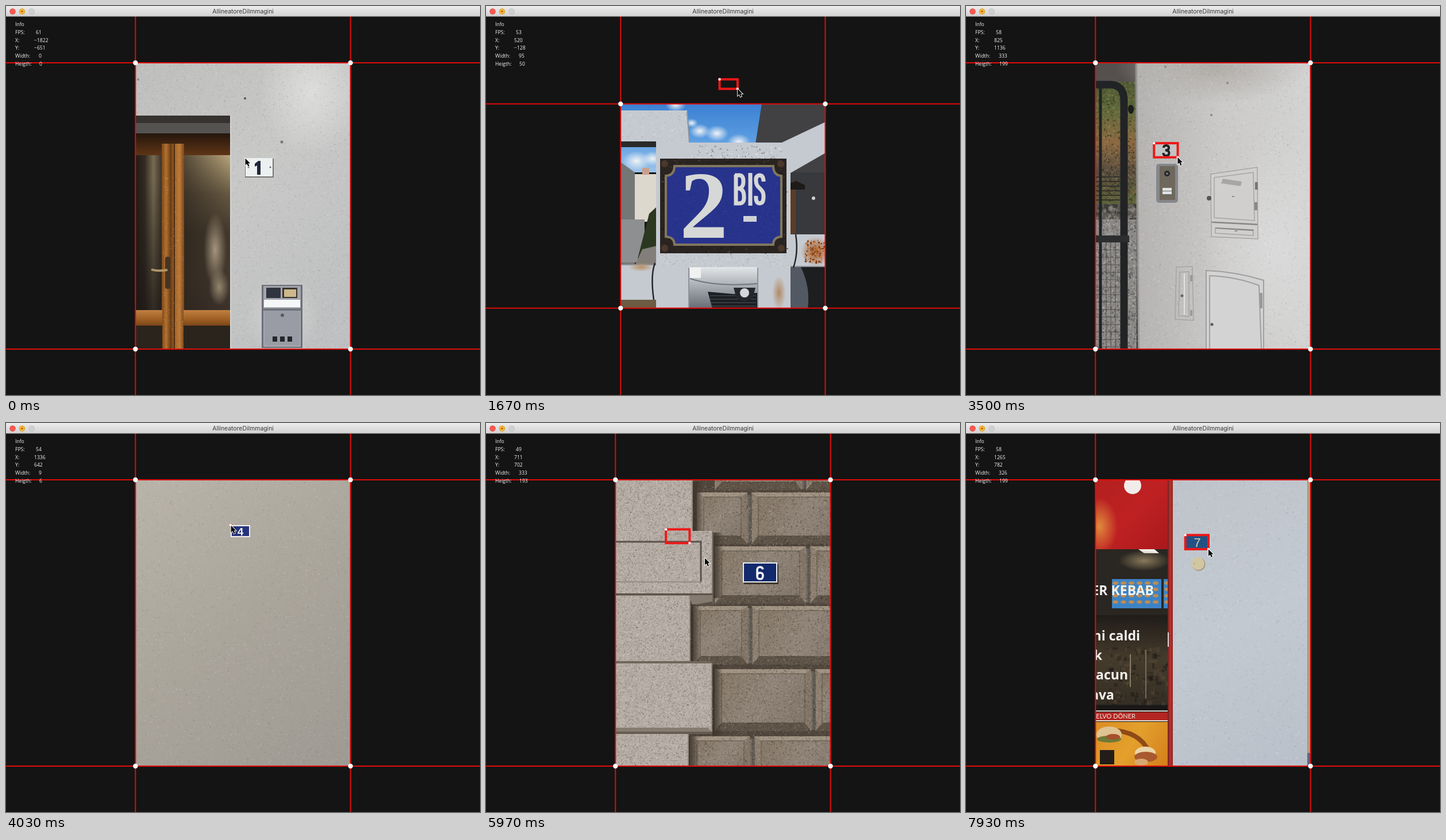
An HTML page with a canvas that plays this animation: 825x678 px, repeating every 8 s.

```html
<!DOCTYPE html>
<html lang="it">
<head>
<meta charset="utf-8">
<title>AllineatoreDiImmagini</title>
<style>
html, body { margin: 0; width: 825px; height: 678px; overflow: hidden; background: #141414; }
canvas { display: block; }
</style>
</head>
<body>
<canvas id="stage" width="825" height="678"></canvas>
<script>
const W = 825, H = 678, LOOP = 8000, TAU = Math.PI * 2;
const stage = document.getElementById('stage').getContext('2d');
let c = stage, seed = 90210;

// Drawing helpers, all in stage pixels on the current context
const rnd = () => (seed = (seed * 16807) % 2147483647) / 2147483647;
const rect = (col, x, y, x2, y2) => { c.fillStyle = col; c.fillRect(x, y, x2 - x, y2 - y); };
const oval = (col, x, y, rx, ry = rx) => {
  c.fillStyle = col; c.beginPath(); c.ellipse(x, y, rx, ry, 0, 0, TAU); c.fill();
};
const fill = (col, d) => { c.fillStyle = col; c.fill(new Path2D(d)); };
const line = (col, w, d) => { c.strokeStyle = col; c.lineWidth = w; c.stroke(new Path2D(d)); };
const text = (s, x, y, font, col, align = 'left') => {
  c.font = font; c.fillStyle = col; c.textAlign = align; c.fillText(s, x, y);
};
const fade = (x, y, x2, y2, ...cols) => {
  const g = c.createLinearGradient(x, y, x2, y2);
  cols.forEach((col, i) => g.addColorStop(i / (cols.length - 1), col));
  return g;
};
const glow = (col, x, y, rx, ry = rx) => {
  c.save(); c.translate(x, y); c.scale(1, ry / rx);
  const g = c.createRadialGradient(0, 0, 0, 0, 0, rx);
  g.addColorStop(0, col); g.addColorStop(1, col + '00');
  c.fillStyle = g; c.fillRect(-rx, -rx, rx * 2, rx * 2); c.restore();
};
const grain = (x, y, x2, y2, n, size = 2, cols = ['#0001', '#fff2']) => {
  for (let i = 0; i < n; i++) {
    c.fillStyle = cols[i % cols.length];
    c.fillRect(x + rnd() * (x2 - x), y + rnd() * (y2 - y), .5 + rnd() * size, .5 + rnd() * size);
  }
};
const SANS = '"Open Sans", sans-serif', ARIAL = '"Liberation Sans", sans-serif', SERIF = '"Liberation Serif", serif';

function door() {
  rect(fade(226, 99, 599, 500, '#bebebc', '#c8c8c7', '#bfc0c1'), 226, 99, 600, 598);
  glow('#dddddb', 530, 150, 90, 110);
  grain(226, 99, 600, 598, 9000, 2);
  oval('#555', 416, 161, 2); oval('#777', 480, 237, 2.5); oval('#888', 230, 128, 2);
  rect('#353230', 226, 191, 390, 204);
  rect('#555352', 226, 204, 390, 222);
  rect(fade(0, 222, 0, 260, '#25160c', '#5e3517'), 226, 222, 390, 260);
  rect(fade(226, 0, 272, 0, '#211c18', '#332b23', '#776a51', '#3a3026'), 226, 260, 272, 530);
  rect(fade(0, 300, 0, 520, '#1c181500', '#1c1815c0'), 226, 260, 272, 530);
  rect(fade(0, 260, 0, 530, '#b9a57b', '#665942', '#42382c', '#44392e', '#3b322a'), 310, 260, 390, 530);
  rect(fade(310, 0, 390, 0, '#2a221bb0', '#2a221b00'), 310, 260, 390, 530);
  glow('#a3947c', 364, 425, 20, 65); glow('#94866d', 371, 490, 18, 32);
  rect(fade(271, 0, 310, 0, '#7c4718', '#b2722f', '#6b3d15', '#a5672a', '#bb7a38', '#7a4719'), 271, 240, 310, 598);
  rect('#4c2b10', 292, 240, 294, 598);
  for (const [a, b] of [[226, 272], [309, 390]]) {
    rect('#2b241d', a, 556, b, 598);
    rect(fade(0, 530, 0, 557, '#c08042', '#a46427', '#7c4619'), a, 530, b, 557);
  }
  grain(272, 260, 309, 598, 400, 2);
  c.fillStyle = '#443524'; c.beginPath(); c.roundRect(277, 437, 9, 56, 4); c.fill();
  line('#b09566', 4, 'M253 459Q262 463 281 460');
  rect('#d2d3d2', 390, 191, 392, 598);
  rect('#777', 416, 266, 466, 299); rect('#edf0f0', 417, 265, 464, 297);
  fill('#20263b', 'M443 270V294H437V278L433 280V275L439 270Z');
  oval('#667', 422, 281, 1.5); oval('#667', 460, 281, 1.5);
  glow('#d4d4d3', 481, 540, 65, 72);
  rect('#6c6f77', 445, 486, 516, 596); rect('#a3a6ad', 448, 488, 513, 594);
  rect('#30343e', 453, 491, 478, 509); rect('#3a352d', 481, 491, 507, 509); rect('#cdb88c', 484, 494, 505, 507);
  rect('#f4f6f7', 449, 512, 512, 525); rect('#70747b', 448, 527, 513, 531); rect('#999ca5', 450, 531, 511, 591);
  oval('#555a62', 481, 539, 3);
  for (const x of [464, 477, 490]) rect('#22252b', x, 576, x + 8, 585);
}

// Plain wall with one number plate
function wall(num, x, y, x2, y2) {
  rect(fade(226, 99, 599, 598, '#b9b4aa', '#aaa59b', '#9e9a93'), 226, 99, 600, 598);
  grain(226, 99, 600, 598, 5000, 2);
  rect('#f0f0ec', x, y, x2, y2); rect('#26337c', x + 2, y + 2, x2 - 2, y2 - 2);
  text(num, (x + x2) / 2, y2 - 3, `bold ${Math.round((y2 - y) * .9)}px ${ARIAL}`, '#f0f0ec', 'center');
}

function fence() {
  const white = '#c5cad1';
  rect(fade(0, 171, 0, 290, '#3b80d3', '#5a9ce0', '#9cc4ea'), 234, 170, 591, 290);
  for (const [x, y, r] of [[372, 218, 18], [402, 222, 20], [358, 204, 11], [262, 270, 24], [290, 266, 18], [440, 237, 20], [330, 172, 18]])
    glow('#f0f3f6', x, y, r, r * .7);
  fill('#414144', 'M480 170H591V400H530V240H469Z');
  rect('#38393c', 530, 290, 591, 400);
  rect('#ddd8cd', 259, 293, 297, 376); rect('#c9a08c', 272, 282, 284, 294);
  fill('#757676', 'M234 272L259 290V450H234Z');
  rect('#8e8f90', 234, 372, 276, 447); fill('#2b371f', 'M297 350L284 362L273 405L264 440H297Z');
  fill('#827e79', 'M260 450L272 424L297 418V452Z');
  rect('#5b3d26', 530, 312, 539, 397); fill('#1d1a18', 'M526 310L540 305L555 312V320H526Z');
  oval('#d0d0cc', 570, 335, 3);
  rect('#6c5c43', 234, 512, 297, 527); rect('#1c1e20', 530, 453, 591, 527);
  fill('#535963', 'M530 455H548Q565 490 560 527H530Z');
  rect(fade(0, 455, 0, 527, '#e3e6e8', '#a3a8af', '#686d75'), 353, 455, 474, 527);
  rect('#f0f1f1', 355, 456, 374, 474); line('#70767e', 2, 'M355 475Q400 490 472 484');
  fill('#1b1e22', 'M386 498L430 502L472 500V527H394Z');
  for (let y = 505; y < 526; y += 6) line('#555a60', 1, `M390 ${y}H470`);
  fill('#24272b', 'M431 491H469L464 510L450 516L436 510Z'); oval('#d5d8da', 450, 500, 8);
  fill(white, 'M234 182H350L354 238H515L591 202V256L530 291V398H591V453H530V527H473V455H353V527H296V512H234V452H296V237H234Z');
  rect('#292a29', 234, 236, 296, 246);
  line('#8d939b', 2, 'M350 184L354 238M353 456V527M473 456V527M234 451H292M530 454H591');
  grain(236, 183, 350, 236, 200, 2, ['#8883', '#fff4']);
  grain(354, 241, 515, 265, 160, 2.5, ['#5b51486c', '#fff5']);
  grain(298, 432, 528, 454, 200, 2, ['#8a6a4840', '#fff4']);
  glow('#a8551f', 574, 428, 26); grain(554, 408, 591, 446, 160, 3, ['#7c3b12', '#c78349']);
  glow('#b98f62', 270, 455, 22, 8); glow('#b08a64', 510, 500, 12, 30);
  line('#25262a', 2.5, 'M294 448Q286 470 292 512M539 398Q544 430 535 456');
  rect('#2a2421', 303, 266, 523, 431);
  grain(303, 266, 523, 431, 500, 3, ['#57473788', '#1118']);
  const plate = 'M328 279H500Q500 295 514 296V402Q500 403 500 416H328Q328 403 313 402V296Q328 295 328 279Z';
  fill('#28338c', plate); line('#81775e', 4, plate);
  grain(325, 296, 512, 402, 900, 1.5, ['#1d276e90', '#46529f70']);
  for (const [x, y] of [[311, 275], [513, 275], [311, 422], [514, 422]]) oval('#4b382b', x, y, 6);
  text('2', 379, 404, 'bold 168px ' + SERIF, '#d5d8d6', 'center');
  line('#d5d8d6', 7, 'M435 294V344H441Q450 344 449 332Q449 320 441 318H435M441 318Q448 316 448 306Q448 295 441 295H433M460 291V348M483 306Q483 295 476 295Q469 296 470 305C470 319 484 317 483 333Q483 344 476 344Q469 343 470 331');
  rect('#cdd1d6', 448, 366, 471, 376);
}

function gate() {
  rect('#625d48', 226, 99, 297, 598);
  rect(fade(0, 130, 0, 345, '#4c5633', '#5f6a3c', '#8c6942', '#554b3f', '#5b6339'), 226, 130, 297, 345);
  grain(226, 130, 297, 345, 1400, 3, ['#2c2f1c90', '#a3a06b50', '#b0704050']);
  for (let y = 298; y < 340; y += 8) line('#35302b', 2, `M226 ${y}H268`);
  rect('#5b5853', 226, 345, 297, 372); grain(226, 345, 297, 372, 100, 8, ['#2e2d2a90', '#98938a80']);
  rect('#8b8886', 226, 372, 297, 598); grain(226, 372, 297, 598, 1400, 3, ['#3c3b3970', '#c8c4c060']);
  rect('#55504e', 226, 99, 297, 132);
  for (let x = 244; x < 268; x += 8) line('#2b2c2c99', 1, `M${x} 412V598`);
  for (let y = 425; y < 598; y += 13) line('#2b2c2c99', 1, `M226 ${y}H268`);
  line('#212325', 13, 'M226 137H252Q275 138 275 165V598');
  line('#212325', 5, 'M234 142V598'); line('#2b2d2f', 12, 'M226 406H284');
  oval('#1b1c1d', 287, 180, 5, 8);
  fill(fade(296, 0, 600, 0, '#b4b3b1', '#cbcac8', '#d3d3d2'), 'M295 99H600V598H299Z');
  glow('#b0aca8', 430, 105, 170, 65); glow('#dadada', 540, 420, 130, 190);
  fill('#80797588', 'M293 99H298L302 598H298Z');
  grain(300, 99, 600, 598, 5000, 2, ['#00000012', '#ffffff30']);
  for (const [x, y] of [[455, 134], [427, 190], [347, 106]]) oval('#8a8784', x, y, 2);
  rect('#c3c4c4', 327, 239, 369, 264);
  line('#222', 4, 'M344 247Q344 243 348.5 243Q353 243 353 247.5Q353 251 347 251.5Q353.5 252 353.5 256Q353.5 261 348.5 261Q343.5 261 343.5 256');
  c.fillStyle = '#85878a'; c.beginPath(); c.roundRect(331, 275, 38, 68, 5); c.fill();
  rect('#6f685c', 337, 279, 364, 338); oval('#26272a', 350, 292, 5); oval('#777', 350, 292, 2);
  rect('#dfe2e4', 342, 317, 358, 322); rect('#dfe2e4', 342, 323, 358, 328);
  const seam = '#a5a4a2';
  fill('#d0cfcd', 'M426 293L507 281L508 406L427 402Z');
  line(seam, 1.5, 'M426 293L507 281L508 406L427 402ZM432 299L500 290L502 374L432 369ZM427 376L508 380M434 387L500 390V400L434 396Z');
  line('#858381', 2, 'M428 377L507 381M434 387L500 391');
  fill('#a6a6a5', 'M447 301L480 306L478 314L444 309Z');
  oval('#575757', 423, 335, 4); rect('#777', 503, 307, 508, 320); rect('#888', 502, 342, 507, 356);
  oval('#888', 465, 332, 2.5, 1); oval('#888', 470, 392, 3, 1);
  line(seam, 1.5, 'M366 455L394 454L396 548L364 546ZM372 464L388 463V541L370 540Z');
  line('#e2e2e1', 2, 'M380 466V538'); oval('#666', 376, 505, 2.5);
  rect('#999', 390, 469, 394, 480); rect('#999', 390, 530, 394, 540);
  fill('#d3d3d3', 'M418 461Q470 463 518 478V598H418Z');
  line('#a09f9e', 2, 'M418 598V461Q470 463 518 478V598M424 598V470Q470 472 510 487L514 598');
  rect('#999', 511, 500, 516, 527); oval('#555', 428, 555, 2.5);
}

function scroll(x, y, r, dir, w = 3) {
  let d = '';
  for (let i = 0; i <= 30; i++) {
    const a = i / 30 * 9, q = r * (1 - i / 38);
    d += (i ? 'L' : 'M') + (x + Math.cos(a) * q * dir) + ' ' + (y + Math.sin(a) * q);
  }
  line('#62696d', w, d);
}

function garden() {
  rect(fade(0, 99, 0, 215, '#3b93de', '#64aee4', '#b5d2e6'), 424, 99, 600, 240);
  fill('#152032', 'M444 99H600V270H425V236L452 226L462 200L441 182L452 160L436 142L450 125Z');
  grain(430, 105, 475, 200, 260, 4, ['#152032', '#1d2a40b0', '#58a2dc90']);
  grain(460, 99, 600, 260, 1500, 3, ['#0c131e', '#2a3b5690', '#4a86ba38']);
  rect(fade(0, 240, 0, 430, '#11180f', '#1f2612', '#262a12'), 424, 240, 600, 440);
  fill('#8b6c68', 'M446 215L462 206L474 222V238H448Z');
  grain(425, 262, 600, 420, 1500, 3, ['#0b0f0a90', '#4d51243c', '#2b331a90']);
  glow('#b0921f', 524, 270, 9, 11); glow('#8a8a25', 470, 366, 25, 6);

  rect(fade(424, 0, 600, 0, '#9a8026', '#a78a36', '#b3994f'), 424, 418, 600, 598);
  fill('#24270f', 'M470 384H600V434Q540 426 484 410Z');
  fill('#a9a49a', 'M447 382L470 384Q500 412 600 434V462Q510 442 462 410Z');
  fill('#c0a766', 'M480 420Q540 432 600 452V570L500 470Z');
  grain(425, 420, 600, 580, 1800, 2.5, ['#43381460', '#e0c88a60', '#81692860']);
  fill('#2b2c11', 'M424 488L468 476L520 508L600 574V598H424Z');
  for (let i = 0; i < 7; i++) {
    const x = 424 + i * 14, y = 448 + i * 16;
    line('#3a351470', 5, `M${x} ${y}Q${x + 35} ${y - 6} ${x + 60} ${y + 18}`);
    line('#a88b2a90', 4, `M${x} ${y + 50}Q${x + 30} ${y + 46} ${x + 48} ${y + 62}`);
  }
  grain(425, 495, 590, 598, 900, 3, ['#15190a80', '#b29b3570', '#59651f90']);
  glow('#6c7a20', 480, 575, 40, 24);
}

function pillar() {
  garden();
  line('#3a3f41', 9, 'M441 260V598'); line('#4d5254', 3, 'M449 262V598');
  for (let x = 472; x < 600; x += 25.3) line('#42474a', 4, `M${x} 297V598`);
  line('#50575b', 4, 'M434 261H600M434 290H600M440 297H600');
  for (let x = 459; x < 610; x += 36) {
    c.strokeStyle = '#62696c'; c.lineWidth = 3;
    c.beginPath(); c.ellipse(x, 275, 15, 11, 0, 0, TAU); c.stroke();
  }
  for (let x = 458; x < 610; x += 25) scroll(x, 316 + (x % 2) * 8, 11, x % 2 ? 1 : -1, 2.5);
  for (let x = 497; x < 600; x += 50) { oval('#62696c', x, 331, 6); scroll(x - 9, 350, 10, 1, 2); scroll(x + 9, 350, 10, -1, 2); }
  line('#646c71', 5, 'M480 253Q530 245 540 190Q550 145 600 132');
  line('#5a6267', 4, 'M505 250Q545 225 541 180Q538 130 572 114');
  scroll(573, 190, 42, 1, 4); scroll(515, 205, 21, -1, 4); scroll(582, 123, 13, -1); scroll(490, 235, 15, 1);

  rect('#26303f', 226, 99, 256, 598);
  grain(226, 99, 254, 212, 400, 3, ['#5577a080', '#16202c', '#79823e70']);
  glow('#858a35', 240, 178, 16, 30);
  fill('#ccd0dc', 'M226 217L252 213V298L226 301Z'); fill('#d0607a', 'M226 237L248 229V238L226 246Z');
  for (let y = 250; y < 274; y += 5) line('#9ca2b2', 1, `M228 ${y}L247 ${y - 2}`);
  fill('#e2bf3e', 'M228 280L249 277V284L228 287Z');
  rect('#20231f', 226, 302, 256, 373); rect('#a3a39c', 229, 302, 232, 373);
  rect('#dddcd6', 226, 374, 255, 474); rect('#a5a196', 226, 420, 254, 424);
  rect('#d9b22e', 229, 386, 239, 402); rect('#d9b22e', 229, 432, 239, 448);
  rect('#1b1d18', 226, 476, 254, 598); rect('#777', 229, 476, 231, 550);

  rect(fade(253, 0, 424, 0, '#9c9791', '#aaa59f', '#a19c96', '#8c8781'), 253, 99, 424, 598);
  rect(fade(0, 480, 0, 598, '#c8c2b800', '#c8c2b830'), 253, 480, 424, 598);
  rect('#9a9388', 245, 99, 426, 130);
  for (const [y, col] of [[106, '#5c554d'], [111, '#b5ada2'], [119, '#746c62'], [129, '#6a635b']]) rect(col, 247, y, 425, y + 2);
  for (let x = 252; x < 420; x += 22) rect('#6b6359', x, 99, x + 12, 104);
  grain(253, 99, 424, 598, 12000, 2, ['#0002', '#fff2', '#3a322a26']);
  c.save();
  c.beginPath(); c.rect(281, 180, 111, 418); c.clip();
  for (let i = 0; i < 90; i++) {
    const x = 250 + rnd() * 140, y = 180 + rnd() * 410;
    line(i % 2 ? '#fff2' : '#0001', 1 + rnd() * 3, `M${x} ${y}l${15 + rnd() * 20} ${-30 - rnd() * 30}`);
  }
  c.restore();
  line('#827c7499', 2, 'M280 598V182Q302 180 308 156H366Q374 180 393 180V598');
  for (const y of [241, 363, 486]) {
    rect('#84796d', 255, y, 279, y + 11); rect('#3f362d', 255, y, 261, y + 11); rect('#5a5046', 255, y, 279, y + 2);
    rect('#756a5e', 395, y, 420, y + 11); rect('#41382f', 403, y + 1, 420, y + 8);
  }
  rect('#222128', 313, 183, 356, 212); rect('#8f92a6', 315, 185, 354, 210); rect('#272a68', 316, 186, 353, 209);
  text('5', 335, 207, 'bold 28px ' + SERIF, '#eceef2', 'center');
}

// Raised block with light top, shaded right and dark foot
function stone(x, y, x2, y2) {
  const l = x + 12, t = y + 8, r = x2 - 11, b = y2 - 14;
  rect('#8d8071', x, y, x2, y2);
  fill('#a09383', `M${x} ${y}H${x2}L${r} ${t}H${l}Z`);
  fill('#857868', `M${x2} ${y}V${y2}L${r} ${b}V${t}Z`);
  fill('#5f5448', `M${x} ${y2}H${x2}L${r} ${b}H${l}Z`);
  rect(fade(l, t, r, b, '#857868', '#91857a', '#82776a'), l, t, r, b);
  line('#5a4f44', 1.5, `M${l} ${b}H${r}`); line('#6e6356', 1.5, `M${l} ${b}V${t}H${r}V${b}`);
}

function ashlar() {
  rect('#51473d', 226, 99, 600, 598);
  const rows = [[398, 82, 117, 550], [367, 121, 211, 455], [398, 215, 315, 557],
    [361, 319, 421, 456], [398, 429, 537, 566], [355, 546, 630, 460]];
  for (const [x, y, y2, split] of rows) {
    stone(x, y, split, y2); stone(split + 7, y, 640, y2);
    rect(fade(split, 0, split + 9, 0, '#7b746c', '#5d564f', '#6f675e'), split, y + 4, split + 8, y2 - 2);
  }
  grain(356, 99, 600, 598, 14000, 1.6, ['#1c150f48', '#e6d8c340', '#2b221a30']);
  for (const [x, y, y2] of [[360, 99, 188], [395, 188, 299], [356, 301, 416], [394, 418, 539], [353, 542, 598]]) {
    rect(fade(x, 0, x + 18, 0, '#3b322ae0', '#3b322a90', '#3b322a00'), x, y + 3, x + 18, y2 + 6);
    rect('#b7aea6', 226, y, x, y2);
    grain(226, y, x, y2, (x - 226) * (y2 - y) / 4, 1.6, ['#2b242238', '#fff3', '#6a5c5430']);
    rect('#8e847a', x - 2, y, x, y2);
  }
  fill('#857a70', 'M226 298H395V316H358L354 301H226Z'); fill('#5a4f45', 'M356 318L395 311V318Z');
  rect('#6b6056', 394, 190, 396, 316);
  line('#5c534d', 3, 'M226 207H374V277'); line('#978c84', 2, 'M226 277H374');
  fill('#877c70', 'M226 531H386L394 539H226Z'); rect('#675c51', 226, 538, 394, 542);
  rect('#5d5248', 226, 297, 395, 300); rect('#71665b', 226, 415, 392, 419);
  rect('#3e362e', 449, 246, 509, 281); rect('#e9ecee', 447, 243, 507, 278); rect('#12296c', 449, 245, 505, 276);
  line('#f2f3f4', 3.6, 'M482 255Q481 251 477 251Q472 251 472 257V267Q472 272 477 272Q482 272 482 266Q482 261 477 261Q473 261 472 265');
}

function shop() {
  rect(fade(226, 99, 351, 219, '#b3201f', '#bf2122', '#a9191d'), 226, 99, 352, 220);
  glow('#e08a3c', 232, 180, 32, 50); oval('#f1ecea', 290, 109, 15);
  rect('#2a2621', 226, 220, 352, 500);
  rect(fade(0, 330, 0, 490, '#1d1a17', '#453b2c', '#352e24'), 226, 335, 352, 490);
  fill('#f3f0e8', 'M300 220H328L336 227H310Z'); glow('#8a7a5c', 310, 240, 45, 18);
  grain(240, 390, 350, 490, 150, 9, ['#15131160', '#6b5c4440']);
  rect('#877c66', 285, 403, 287, 460); rect('#776c58', 312, 395, 314, 480);
  for (const [a, b] of [[254, 340], [344, 352]]) {
    rect('#3c83c6', a, 272, b, 323);
    for (let y = 279; y < 323; y += 11) for (let x = a + 6; x < b; x += 14) oval('#c28a4d', x, y, 5, 3);
  }
  const bold = 'bold 23px ' + SANS;
  for (const [s, x, y] of [['ER KEBAB', 327, 300], ['ni caldi', 303, 379], ['k', 237, 413], ['acun', 282, 447], ['ava', 258, 482]])
    text(s, x, y, bold, '#f3f2ee', 'right');
  rect('#1a1817', 226, 492, 352, 502); rect('#d9d3cd', 226, 501, 352, 503);
  rect('#b32622', 226, 504, 352, 519); rect('#e5ddd3', 226, 518, 352, 520);
  text('ZELVO DÖNER', 295, 515, '11px Lato, sans-serif', '#f2e9e2', 'right');
  rect(fade(226, 521, 351, 598, '#dd8d22', '#e3a02c', '#d47e1b'), 226, 521, 352, 598);
  line('#8f4a18', 8, 'M262 536Q312 542 322 585');
  oval('#dfc391', 249, 543, 22, 14); oval('#6e7a35', 249, 551, 21, 6); oval('#a5502d', 256, 547, 12, 5);
  oval('#ead5a8', 312, 575, 18, 11); oval('#a8592f', 313, 582, 20, 9); oval('#d9a870', 305, 591, 12, 6);
  rect('#221d18', 233, 570, 258, 595);
  rect(fade(351, 0, 360, 0, '#71201d', '#b33430', '#8f2522'), 351, 99, 360, 598);
  rect('#d9d7d3', 351, 365, 353, 390);
  rect(fade(360, 99, 595, 598, '#bfc4ca', '#c2c9d1', '#b9c0c9'), 360, 99, 595, 598);
  grain(360, 99, 595, 598, 2600, 3, ['#0000000a', '#ffffff1c']);
  rect(fade(594, 0, 600, 0, '#a88d70', '#d2b78f'), 594, 99, 600, 598); rect('#5f6884', 594, 575, 600, 598);
  rect('#235183', 383, 197, 422, 220);
  text('7', 402.5, 216, '22px ' + ARIAL, '#d5ccb6', 'center');
  oval('#9d9680', 405, 246, 11.5); oval('#d2c6a2', 404, 245, 11); oval('#aa9f80', 397, 245, 1.2);
}

const TALL = { x: 225.3, y: 98.6, w: 374.3, h: 499.2, k: 8.086 };
const WIDE = { x: 234.3, y: 170.2, w: 356.2, h: 356.2, k: 3.02 };
// Start of each photo and the time its selection is dragged
const scenes = [
  { at: 0, drag: [30, 450], draw: door },
  { at: 700, drag: [1090, 1560], draw: () => wall('2', 406, 128, 438, 145) },
  { at: 1640, drag: [1990, 2430], draw: fence, box: WIDE },
  { at: 2660, drag: [2940, 3370], draw: gate },
  { at: 3670, drag: [3980, 4440], draw: () => wall('4', 391, 178, 425, 199) },
  { at: 4650, drag: [5040, 5700], draw: pillar },
  { at: 5930, drag: [6220, 6730], draw: ashlar },
  { at: 6930, drag: [7250, 7720], draw: shop }
];
// Cursor rests: from, to, x, y
const rests = [
  [0, 30, 416.5, 265.5], [450, 720, 464, 297], [1050, 1090, 406.5, 127.8], [1560, 1700, 437.9, 144.4],
  [1950, 1990, 301.2, 266.2], [2430, 2560, 523, 432.4], [2600, 2690, 454.5, 350], [2900, 2940, 327.3, 239.1],
  [3370, 3680, 368.5, 263.7], [3930, 3980, 390.5, 178], [4440, 4600, 424.3, 198.5], [4690, 4720, 425, 203],
  [5000, 5040, 313.2, 185.4], [5700, 5930, 354.4, 209.3], [5970, 5975, 381, 235.5], [6180, 6220, 448, 244],
  [6730, 6950, 506, 277], [7200, 7250, 381.7, 195.3], [7720, LOOP, 422, 219.9]
];
const rates = [[0, 61], [900, 52], [1670, 53], [2600, 56], [3500, 58], [4700, 48], [5970, 49], [7930, 58], [LOOP, 58]];

for (const s of scenes) {
  s.box = s.box || TALL;
  s.photo = Object.assign(document.createElement('canvas'), { width: W, height: H });
  c = s.photo.getContext('2d');
  c.beginPath(); c.rect(s.box.x, s.box.y, s.box.w, s.box.h); c.clip();
  s.draw();
}
c = stage;

function cursorAt(t) {
  const i = rests.findIndex(r => t <= r[1]);
  const [from, , x, y] = rests[i];
  if (t >= from) return [x, y];
  const [, left, px, py] = rests[i - 1];
  const u = (t - left) / (from - left), e = u * u * (3 - 2 * u);
  return [px + (x - px) * e, py + (y - py) * e];
}

function selectionAt(t) {
  const s = scenes.filter(v => t > v.drag[0]).pop();
  if (!s) return [0, 18.1, 0, 18.1];
  return [...cursorAt(s.drag[0]), ...cursorAt(Math.min(t, s.drag[1]))];
}

function fpsAt(t) {
  const i = rates.findIndex(r => r[0] > t), [a, va] = rates[i - 1], [b, vb] = rates[i];
  return Math.round(va + (vb - va) * (t - a) / (b - a));
}

function titleBar() {
  rect(fade(0, 0, 0, 18, '#ececec', '#d2d2d2'), 0, 0, W, 18);
  rect('#aaa', 0, 17.5, W, 18.5);
  for (const [x, col, rim] of [[11.5, '#fc5753', '#df4744'], [28, '#f5b63b', '#d59a2c'], [44.5, '#d0d0d0', '#bcbcbc']]) {
    oval(rim, x, 9.5, 5.2); oval(col, x, 9.5, 4.5);
  }
  oval('#a9701b', 28, 9.5, 1.7);
  text('AllineatoreDiImmagini', 412.5, 13.3, '10.4px Inter, sans-serif', '#3a3a3a', 'center');
}

function info(t, box, [x, y, x2, y2]) {
  const num = v => String(Math.round(v * box.k)).replace('-', '−');
  const rows = [['Info', '', 0], ['FPS:', fpsAt(t), 52], ['X:', num(x - box.x), 49], ['Y:', num(y - box.y), 49],
    ['Width:', num(x2 - x), 57], ['Heigth:', num(y2 - y), 58]];
  rows.forEach(([label, value, vx], i) => {
    const by = 35.2 + i * 13.7, font = '8.6px ' + SANS;
    text(label, 16, by, font, '#f4f4f4'); text(value, vx, by, font, '#f4f4f4');
  });
}

function render(t) {
  const { photo, box } = scenes.filter(s => t >= s.at).pop();
  rect('#141414', 0, 0, W, H);
  c.drawImage(photo, 0, 0);
  const xs = [box.x, box.x + box.w], ys = [box.y + .4, box.y + box.h + .2];
  for (const x of xs) rect('#e20b0b', x - 1, 18, x + 1, H);
  for (const y of ys) rect('#e20b0b', 0, y - 1, W, y + 1);
  for (const x of xs) for (const y of ys) oval('#fff', x, y, 4.2);

  const sel = selectionAt(t), [x, y, x2, y2] = sel;
  if (x2 > x) {
    c.strokeStyle = '#ee1717'; c.lineWidth = 4; c.strokeRect(x, y, x2 - x, y2 - y);
    oval('#fff', x, y, 2.2); oval('#fff', x2, y2, 2.2);
  }
  info(t, box, sel);
  titleBar();

  const [mx, my] = cursorAt(t);
  c.save(); c.translate(mx, my);
  const arrow = 'M0 0V12L2.8 9.6L4.9 14.2L7 13.2L5 8.8H8.6Z';
  line('#fff', 1.8, arrow); fill('#080808', arrow);
  c.restore();
}

const start = performance.now();
(function tick() {
  render((performance.now() - start) % LOOP);
  requestAnimationFrame(tick);
})();
</script>
</body>
</html>
```
